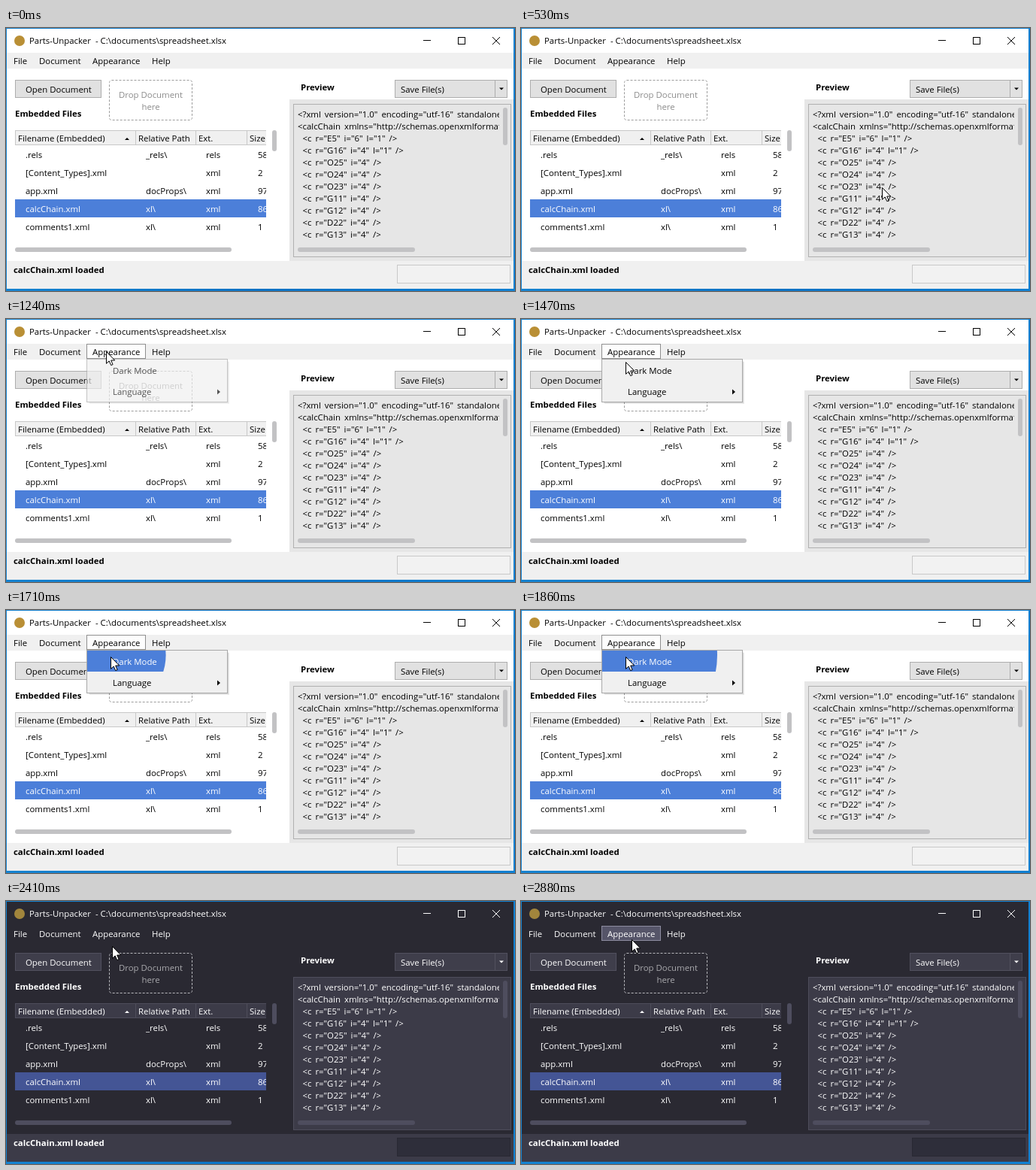
Animation of 677 by 350 pixels, one loop 2960 ms. Source, as an HTML page:

```html
<!DOCTYPE html>
<html lang="en">
<head>
<meta charset="utf-8">
<title>Theme switch</title>
<style>
html, body { margin: 0; width: 100%; height: 100%; overflow: hidden; }
svg {
  display: block; width: 677px; height: 350px;
  font: 11.4px "Open Sans", "Noto Sans", sans-serif;
  --win: #fff; --bar: #f0f0f0; --panel: #e6e6e6; --code: #e6e6e6; --edge: #b0b0b0;
  --head: #f0f0f0; --line: #c8c8c8; --btn: #e1e1e1; --btnEdge: #adadad;
  --text: #000; --dim: #8c8c8c; --dash: #9c9c9c; --sel: #4c7fd9; --thumb: #c2c2c4;
  --status: #f0f0f0; --slot: #f2f2f2; --slotEdge: #c8c8c8; --hover: #fdfdfd; --hoverEdge: #8f8f8f;
  --menu: #f0f0f0; --menuEdge: #a8a8a8; --icon: #b98f35;
}
svg.dark {
  --win: #2a2932; --bar: #2a2932; --panel: #2a2932; --code: #3c3b48; --edge: #4e4d5b;
  --head: #3c3b48; --line: #4e4d5b; --btn: #3f3e4b; --btnEdge: #51505e;
  --text: #fff; --dim: #a9a9ad; --dash: #b8b8bd; --sel: #445595; --thumb: #4e4d5e;
  --status: #3c3b48; --slot: #2e2e3a; --slotEdge: #282833; --hover: #565569; --hoverEdge: #8d8ca0;
  --menu: #3c3b48; --menuEdge: #4e4d5b; --icon: #a1853c;
}
text { fill: var(--text); white-space: pre; }
.b { font-weight: 700; }
.code { word-spacing: 2px; }
rect, .crisp { shape-rendering: crispEdges; }
.round { shape-rendering: auto; }
</style>
</head>
<body>
<svg id="stage" viewBox="0 0 677 350" xmlns="http://www.w3.org/2000/svg">
  <defs>
    <linearGradient id="desk">
      <stop offset="0" stop-color="#1683d0"/>
      <stop offset=".5" stop-color="#0a72c4"/>
      <stop offset="1" stop-color="#1080d2"/>
    </linearGradient>
    <clipPath id="codeClip"><rect x="383" y="102" width="273" height="188"/></clipPath>
    <clipPath id="listClip"><rect x="12" y="136" width="334" height="150"/></clipPath>
    <clipPath id="spot"><circle id="ripple" cx="140" cy="60" r="0"/></clipPath>
  </defs>
  <g id="base"></g>
  <g id="menu"></g>
  <path id="cursor" d="M.5 .5V16.3L4.2 12.9L6.7 18.6L9.1 17.6L6.7 12H11.7Z" fill="#fff" stroke="#000" stroke-width="1"/>
</svg>
<script>
const LOOP = 2960;
const $ = id => document.getElementById(id);
const v = name => `var(--${name})`;

const rect = (x, y, w, h, fill, extra = '') =>
  `<rect x="${x}" y="${y}" width="${w}" height="${h}" style="fill:${fill}" ${extra}/>`;
const box = (x, y, w, h, fill, edge, extra = '') =>
  rect(x + .5, y + .5, w - 1, h - 1, `${v(fill)};stroke:${v(edge)}`, extra);
const esc = s => s.replace(/&/g, '&amp;').replace(/</g, '&lt;').replace(/>/g, '&gt;');
const text = (x, y, s, extra = '') => `<text x="${x}" y="${y}" ${extra}>${esc(s)}</text>`;
const bold = (x, y, s) => text(x, y, s, 'class="b"');
const shape = (d, fill = 'text') => `<path d="${d}" style="fill:${v(fill)}"/>`;
const stroke = (d, color = 'text', cls = '') =>
  `<path d="${d}" class="${cls}" style="fill:none;stroke:${v(color)}"/>`;
const thumb = (x, y, w, h) => rect(x, y, w, h, v('thumb'), 'rx="3" class="round"');

function frame() {
  return rect(0, 0, 677, 350, 'url(#desk)')
    + rect(1, 1, 674, 346, v('win'))
    + rect(1, 33, 674, 21, v('bar'))
    + `<circle cx="18" cy="17" r="7" style="fill:${v('icon')}"/>`
    + text(31, 21, 'Parts-Unpacker') + text(119, 21, '- C:\\documents\\spreadsheet.xlsx')
    + stroke('M555 16.5H565', 'text', 'crisp')
    + stroke('M601.5 12.5H610.5V21.5H601.5Z', 'text', 'crisp')
    + stroke('M647 12L657 22M657 12L647 22')
    + `<rect id="hover" y="33.5" height="19" style="fill:${v('hover')};stroke:${v('hoverEdge')}"/>`
    + text(10, 48, 'File') + text(44, 48, 'Document')
    + text(115, 48, 'Appearance') + text(194, 48, 'Help');
}

function controls() {
  const dim = `text-anchor="middle" style="fill:${v('dim')}"`;
  return box(12, 69, 115, 24, 'btn', 'btnEdge') + text(26, 86, 'Open Document')
    + rect(137.5, 69.5, 110, 53, `none;stroke:${v('dash')}`, 'rx="3" class="round" stroke-dasharray="3 2"')
    + text(192.5, 93, 'Drop Document', dim) + text(192.5, 109, 'here', dim)
    + bold(12, 118, 'Embedded Files') + bold(392, 83, 'Preview')
    + box(517, 69, 150, 24, 'btn', 'btnEdge') + text(525, 86, 'Save File(s)')
    + stroke('M650.5 70V92', 'btnEdge', 'crisp') + shape('M656 79.5H662L659 82.5Z');
}

function list() {
  const rows = [
    ['.rels', '_rels\\', 'rels', '58'],
    ['[Content_Types].xml', '', 'xml', '2'],
    ['app.xml', 'docProps\\', 'xml', '97'],
    ['calcChain.xml', 'xl\\', 'xml', '86'],
    ['comments1.xml', 'xl\\', 'xml', '1']
  ];
  const cols = [26, 186, 266, 335];
  let s = box(12, 136, 340, 20, 'head', 'line')
    + stroke('M172.5 137V155M252.5 137V155M320.5 137V155', 'line', 'crisp')
    + text(16, 151, 'Filename (Embedded)') + text(176, 151, 'Relative Path')
    + text(256, 151, 'Ext.') + text(324, 151, 'Size')
    + shape('M158 149H164L161 146Z')
    + rect(12, 228, 334, 24, v('sel'));
  rows.forEach((row, i) => row.forEach((cell, j) => {
    s += text(cols[j], 173 + 24 * i, cell, i === 3 ? 'style="fill:#fff"' : '');
  }));
  return `<g clip-path="url(#listClip)">${s}</g>`
    + thumb(354, 136, 6, 28) + thumb(12, 292, 288, 6);
}

function preview() {
  const cells = ['E5" i="6" l="1', 'G16" i="4" l="1'];
  for (const ref of 'O25 O24 O23 G11 G12 D22 G13'.split(' ')) cells.push(`${ref}" i="4`);
  let s = text(388, 119, '<?xml version="1.0" encoding="utf-16" standalone="yes"?>')
    + text(388, 135, '<calcChain xmlns="http://schemas.openxmlformats.org');
  cells.forEach((c, i) => { s += text(394.5, 151 + 16 * i, `<c r="${c}" />`); });
  return rect(377, 95, 298, 215, v('panel'))
    + box(382, 101, 290, 204, 'code', 'edge')
    + `<g clip-path="url(#codeClip)" class="code">${s}</g>`
    + thumb(661, 106, 6, 50) + thumb(388, 292, 156, 6);
}

function status() {
  return rect(1, 310, 674, 37, v('status'))
    + bold(10, 326, 'calcChain.xml loaded')
    + box(520, 315, 151, 25, 'slot', 'slotEdge');
}

function dropdown() {
  const shadow = [3, 2, 1].map(d => rect(108 + d, 54 + d, 186, 56, '#000', 'opacity=".08"')).join('');
  return shadow + box(107, 53, 188, 58, 'menu', 'menuEdge')
    + text(142, 73, 'Dark Mode') + text(142, 101, 'Language')
    + shape('M281 93.5V100.5L285 97Z')
    + '<g clip-path="url(#spot)">' + rect(108, 54, 186, 28, v('sel'))
    + text(142, 73, 'Dark Mode', 'style="fill:#fff"') + '</g>'
    + `<path id="tick" d="M120.5 69L123.5 72L129.5 65.5" style="fill:none;stroke:${v('text')};stroke-width:2"/>`;
}

$('base').innerHTML = frame() + controls() + list() + preview() + status();
$('menu').innerHTML = dropdown();

const tickStart = k => Math.round((374 + 78.46 * k) / 10) * 10;
function tickAt(t) {
  let k = -1;
  while (tickStart(k + 1) <= t) k++;
  return k;
}

// tick, x, y
const path = [
  [0, 660, 328], [1, 604, 288], [2, 480, 212], [3, 340, 136], [4, 212, 80], [5, 126, 52],
  [6, 96, 44], [7, 123, 43], [9, 131, 42], [11, 133, 43], [13, 137, 52],
  [14, 139, 57], [15, 139, 61], [16, 139, 62], [23, 139, 62], [26, 141, 60],
  [29, 145, 51], [31, 145, 51], [32, 147, 51]
];
function pointAt(k) {
  const i = Math.max(1, path.findIndex(p => p[0] >= k));
  const [a, ax, ay] = path[i - 1], [b, bx, by] = path[i];
  const f = (k - a) / (b - a);
  return [Math.round(ax + (bx - ax) * f), Math.round(ay + (by - ay) * f)];
}

const tabs = [[2, 36], [36, 107], [107, 186], [186, 227]];
function tabAt(k, x, y) {
  if (k < 0) return null;
  if (k >= 10 && k < 20) return tabs[2];
  return y >= 33 && y < 53 ? tabs.find(([l, r]) => x >= l && x < r) : null;
}

function menuAlpha(k) {
  if (k < 10 || k > 20) return 0;
  if (k === 20) return .23;
  return Math.min(1, (k - 9) / 3);
}

function render(t) {
  const k = tickAt(t), dark = k >= 20;
  const [x, y] = pointAt(Math.max(0, k));
  $('stage').setAttribute('class', dark ? 'dark' : '');

  $('cursor').setAttribute('transform', `translate(${x} ${y})`);
  $('cursor').style.display = k < 0 ? 'none' : '';

  const tab = tabAt(k, x, y), hover = $('hover');
  hover.style.display = tab ? '' : 'none';
  if (tab) {
    hover.setAttribute('x', tab[0] + .5);
    hover.setAttribute('width', tab[1] - tab[0] - 1);
  }

  const alpha = menuAlpha(k);
  $('menu').style.display = alpha ? '' : 'none';
  $('menu').setAttribute('opacity', alpha);
  $('ripple').setAttribute('r', dark ? 200 : Math.max(0, 24.2 * (k - 14)));
  $('tick').style.display = dark ? '' : 'none';
}

const start = performance.now();
function loop(now) {
  render(Math.max(0, now - start) % LOOP);
  requestAnimationFrame(loop);
}
render(0);
requestAnimationFrame(loop);
</script>
</body>
</html>
```
